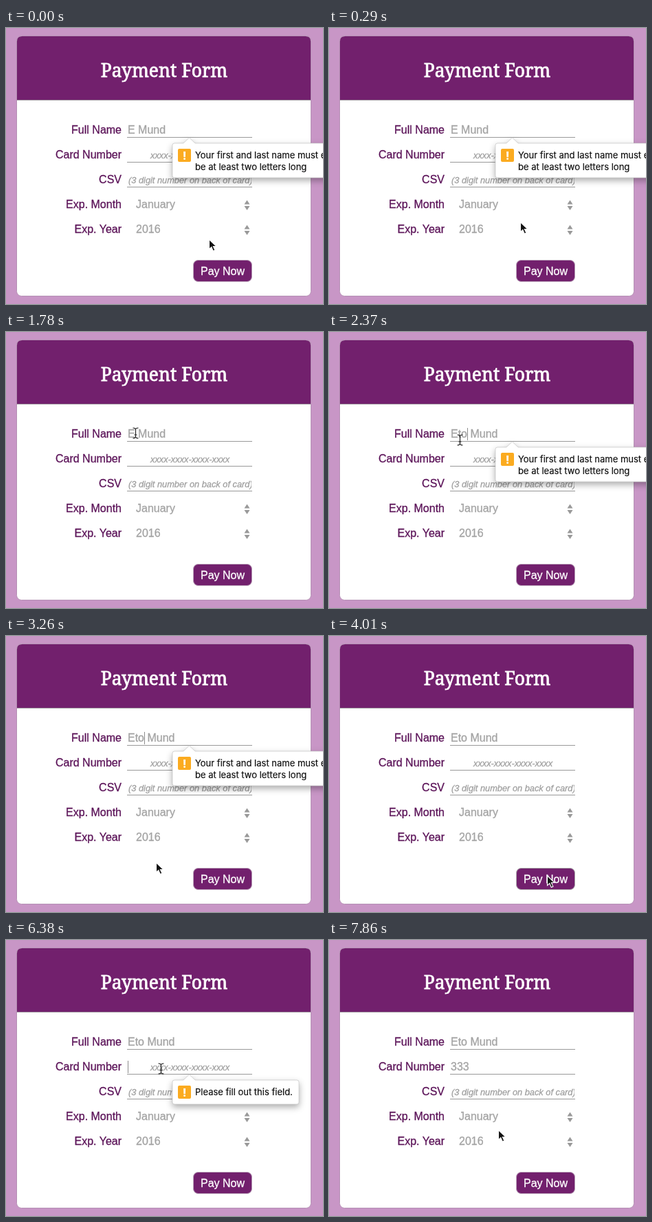
These frames come from a looping animation (461x400 px, 8000 ms). An HTML page:

```html
<!DOCTYPE html>
<html lang="en">
<head>
<meta charset="utf-8">
<title>Payment Form</title>
<style>
  html, body { margin: 0; width: 100%; height: 100%; overflow: hidden; background: #c896c6; }
  svg { display: block; width: 461px; height: 400px; }
  text { font: 16px "Liberation Sans", Arial, sans-serif; white-space: pre; stroke-width: .3; }
  .title { font: 26.4px "Noto Serif", serif; fill: #fff; stroke: #fff; stroke-width: .8; text-anchor: middle; }
  .label { fill: #5c1459; stroke: #5c1459; text-anchor: end; }
  .value { fill: #a3a3a3; stroke: #a3a3a3; }
  .hint { font-size: 12.8px; font-style: italic; fill: #a0a0a0; stroke: #a0a0a0; }
  .pay { fill: #fff; stroke: #fff; }
  .tip { font: 13px Inter, sans-serif; fill: #111; stroke: #111; stroke-width: .2; }
  .mark { font: 800 16px Inter, sans-serif; fill: #fff; text-anchor: middle; }
  .bubble { fill: #fff; stroke: #c4c4c4; stroke-width: .7; filter: drop-shadow(0 4px 5px rgba(0, 0, 0, .32)); }
</style>
</head>
<body>
<svg viewBox="0 0 461 400">
  <defs>
    <clipPath id="field"><rect x="176" y="208" width="181" height="24"/></clipPath>
    <path id="arrows" d="M346.5 255.5h8l-4-6zM346.5 258h8l-4 6z" fill="#999"/>
    <g id="alert">
      <rect x="250" width="19" height="19" rx="2" fill="#fbab20"/>
      <text class="mark" x="259.5" y="15.5">!</text>
    </g>
  </defs>

  <rect x="15.5" y="11.5" width="428" height="377" rx="7" fill="#fff" stroke="#b48fb3"/>
  <path d="M16 104V19q0-7 7-7h413q7 0 7 7v85z" fill="#72206d"/>
  <path d="M16 104.5h427" stroke="#9b8f9a"/>
  <text class="title" x="230" y="71">Payment Form</text>

  <g class="label">
    <text x="168" y="153">Full Name</text>
    <text x="168" y="189">Card Number</text>
    <text x="168" y="225">CSV</text>
    <text x="168" y="261">Exp. Month</text>
    <text x="168" y="297">Exp. Year</text>
  </g>
  <path d="M176 158.5h182m-182 36h182m-182 36h182" stroke="#999"/>

  <text id="name" class="value" x="177" y="153"><tspan id="first"></tspan> Mund</text>
  <text id="card" class="value" x="177" y="189"></text>
  <text id="hint" class="hint" x="210" y="189">xxxx-xxxx-xxxx-xxxx</text>
  <text class="hint" x="178" y="225" clip-path="url(#field)">(3 digit number on back of card)</text>
  <text class="value" x="189" y="261">January</text>
  <text class="value" x="189" y="297">2016</text>
  <use href="#arrows"/>
  <use href="#arrows" y="36"/>

  <rect id="button" x="272.5" y="336.5" width="85" height="31" rx="7" fill="#72206d"/>
  <text class="pay" x="283" y="358">Pay Now</text>
  <path id="caret" d="M.5 0v18" stroke="#8c8c8c"/>

  <g id="nameTip">
    <path class="bubble" d="M245 167h13l8.5-8 8.500 8h225v50H245q-3 0-3-3v-44q0-3 3-3z"/>
    <use href="#alert" y="175"/>
    <text class="tip" x="275" y="189">Your first and last name must each</text>
    <text class="tip" x="275" y="206">be at least two letters long</text>
  </g>
  <g id="cardTip">
    <path class="bubble" d="M245 203h13l8.500-8 8.500 8h148q3 0 3 3v29q0 3-3 3H245q-3 0-3-3v-29q0-3 3-3z"/>
    <use href="#alert" y="211"/>
    <text class="tip" x="275" y="225">Please fill out this field.</text>
  </g>

  <path id="pointer" d="M0 0v14l3.300-3 2.500 5.700 2.600-1.100-2.500-5.600h4.600z" fill="#111" stroke="#fff" stroke-width="1.100"/>
  <path id="beam" d="M-4-7.500q4 0 4 2.500q0-2.500 4-2.500M0-5V5M-4 7.500q4 0 4-2.500q0 2.500 4 2.500M-2 2.500h4" fill="none" stroke="#222" stroke-width="1.200"/>
</svg>
<script>
const $ = id => document.getElementById(id);
const LOOP = 8000, STEP = 148.3, BLINK = 500 / STEP;

// Steps at which the user acts
const NAME_CLICK = 9, NAME_TYPE = 13, NAME_LEAVE = 23, SUBMIT = 30, CARD_TYPE = 45;

// Pointer moves: first step, last step, x, y
const moves = [
  [0, 8, 188, 146], [15, 22, 218, 328], [23, 27, 317, 347], [32, 37, 225, 186], [52, 53, 246, 275]
];

const clamp = v => Math.min(1, Math.max(0, v));
const ease = u => u * u * (3 - 2 * u);
const inside = (x, y, left, top, right, bottom) => x >= left && x <= right && y >= top && y <= bottom;
const fade = (n, open, close) => clamp((n - open + 1) / 2) * clamp((close + 1 - n) / 2);
const blink = (n, start) => Math.floor((n + .5 - start) / BLINK) % 2 === 0;
const show = (id, opacity) => $(id).style.opacity = Number(opacity);

function pointerAt(n) {
  let x = 295, y = 306;
  for (const [from, to, endX, endY] of moves) {
    const e = ease(clamp((n - from) / (to - from)));
    x += (endX - x) * e;
    y += (endY - y) * e;
  }
  return [Math.round(x), Math.round(y)];
}

function drawCaret(n) {
  const onName = n < SUBMIT;
  const typed = onName ? $("first") : $("card");
  const x = 177 + Math.round(typed.textContent ? typed.getComputedTextLength() : 0);
  // Every key press restarts the blinking
  const start = onName
    ? (n < NAME_TYPE ? NAME_CLICK : Math.min(n, NAME_TYPE + 1))
    : (n < CARD_TYPE ? SUBMIT : Math.min(n, CARD_TYPE + 2));
  const focused = n >= NAME_CLICK && (n < NAME_LEAVE || !onName);
  show("caret", focused && blink(n, start));
  $("caret").setAttribute("transform", `translate(${x} ${onName ? 139 : 175})`);
}

function draw(time) {
  const n = Math.floor((time % LOOP + 9) / STEP);
  const [x, y] = pointerAt(n);

  $("first").textContent = "Eto".slice(0, Math.max(1, n - NAME_TYPE + 2));
  $("card").textContent = "333".slice(0, Math.max(0, n - CARD_TYPE + 1));
  show("hint", n < CARD_TYPE);
  show("nameTip", fade(n, -1, NAME_CLICK) + fade(n, NAME_TYPE, NAME_LEAVE));
  show("cardTip", fade(n, SUBMIT, CARD_TYPE));
  drawCaret(n);

  const overField = [138, 174, 210].some(top => inside(x, y, 176, top, 358, top + 21));
  show("beam", overField);
  show("pointer", !overField);
  for (const id of ["beam", "pointer"])
    $(id).setAttribute("transform", `translate(${x + .5} ${y + .5})`);
  $("button").setAttribute("stroke", inside(x, y, 272, 336, 358, 368) ? "#aaa" : "#b9a0b8");
  requestAnimationFrame(draw);
}
requestAnimationFrame(draw);
</script>
</body>
</html>
```
